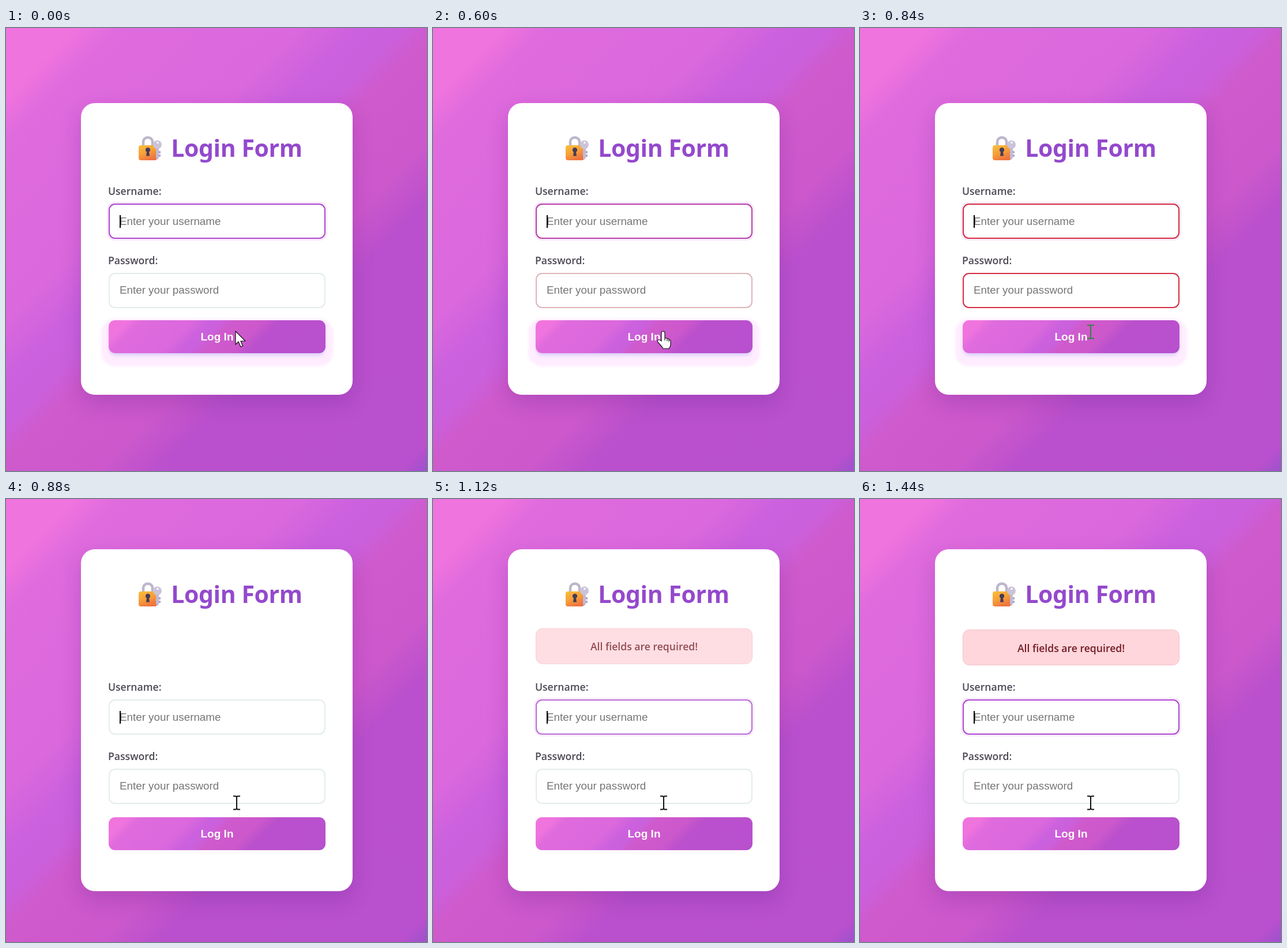
Animation, 730 px wide and 767 px high, one loop 1480 ms. Source, as an HTML page:

```html
<!DOCTYPE html>
<html lang="en">
<head>
<meta charset="utf-8">
<title>Login Form</title>
<style>
  :root {
    --blend: linear-gradient(135deg, #f074de 8%, #df6bdd 13%, #db68dd 34%, #cb61de 41%,
      #cb60dc 46%, #cf5acc 50%, #cc58cc 62%, #ba50cd 69%, #b950cd 97%, #a451cd 99%);
  }
  html, body { margin: 0; width: 100%; height: 100%; overflow: hidden; }
  #stage { position: relative; width: 730px; height: 767px; overflow: hidden; background: var(--blend); }
  #stage > * { position: absolute; box-sizing: border-box; }
  #card {
    left: 130px; width: 471px; border-radius: 24px; background: #fff;
    box-shadow: 0 15px 36px rgba(90, 30, 140, .24);
  }
  .field, #button { left: 178px; width: 376px; border-radius: 11px; }
  .field { height: 61px; border: 2px solid; background: #fff; }
  #button { height: 57px; background: var(--blend); }
  #button.hover { box-shadow: 0 5px 7px -2px #d3c6f7, 0 10px 4px 13px #ffedff; }
  svg { left: 0; top: 0; }
  .label { font: 600 17.6px "Open Sans", "Noto Sans", sans-serif; fill: #4d4854; }
  .hint { font: 18.8px "Liberation Sans", Arial, sans-serif; fill: #757575; }
  .title { font: 700 41px "Noto Sans", sans-serif; letter-spacing: -.4px; fill: #9449cd; }
  .action { font: 700 19px "Liberation Sans", Arial, sans-serif; fill: #fff; }
  .mid { text-anchor: middle; }
</style>
</head>
<body>
<div id="stage">
  <div id="card"></div>
  <div id="user" class="field"></div>
  <div id="pass" class="field"></div>
  <div id="button"></div>
  <svg width="730" height="767">
    <defs>
      <linearGradient id="brass" x2=".5" y2="1">
        <stop offset=".1" stop-color="#f9b93c"/>
        <stop offset=".55" stop-color="#f69f38"/>
        <stop offset="1" stop-color="#ee7440"/>
      </linearGradient>
    </defs>
    <g id="head">
      <path d="M238 206V197a8 7.500 0 0 1 16 0V206" fill="none" stroke="#bdb7cb" stroke-width="4.500"/>
      <rect x="230" y="203" width="32" height="26" rx="4" fill="url(#brass)"/>
      <path d="M246 207a4 4 0 0 1 2 7.500l1 7h-6l1-7a4 4 0 0 1 2-7.500z" fill="#433b59"/>
      <path d="M260 206h5v19l-2.500 3-2.500-3z" fill="#c3b9d2"/>
      <path d="M265 213h3v4h-3zM265 219h3v4h-3z" fill="#b2a6c5"/>
      <circle cx="262.500" cy="202" r="7.500" fill="#cbc3d8"/>
      <circle cx="263" cy="198.500" r="1.800" fill="#fff"/>
      <text class="title mid" x="400" y="223">Login Form</text>
    </g>
    <g id="error">
      <rect x="178.500" y="226.500" width="375" height="61" rx="11" fill="#ffd6dc" stroke="#f3c0ca"/>
      <text class="label mid" x="366" y="264.500" style="fill:#721c24">All fields are required!</text>
    </g>
    <g id="form">
      <text class="label" x="177" y="289">Username:</text>
      <text class="hint" x="197" y="340.500">Enter your username</text>
      <rect x="197" y="324" width="2" height="22"/>
      <text class="label" x="177" y="408.500">Password:</text>
      <text class="hint" x="197" y="460">Enter your password</text>
    </g>
    <text id="action" class="action mid" x="366">Log In</text>
    <g fill="#fff" stroke="#111" stroke-width="1.200" stroke-linejoin="round">
      <path id="arrow" transform="translate(398 525)" d="M0 0V23L5 18L9 27L12.500 25.500L9 17H17Z"/>
      <path id="hand" transform="translate(388 525)" d="M8 3q0-3 3-3t3 3v9q3-1 4 1 3-1 3 2 3-1 3 2v6q0 4-3 7h-10l-2-3-7-8q-2-3 1-4 2-1 5 2zM14 12v4M18 13v4M21 15v3"/>
      <path id="beam" transform="translate(400 526)" fill="none" stroke-width="2"
        d="M-6-11.500h4.500l1.500 1.500 1.500-1.500H6M0-10V10M-6 11.500h4.500l1.500-1.500 1.500 1.500H6"/>
    </g>
  </svg>
</div>
<script>
  const LOOP = 1480, STEP = 40;
  const INVALID_AT = 540, HAND_AT = 560, BEAM_AT = 820, ERROR_AT = 880;
  const IDLE = [227, 236, 236], FOCUS = [176, 72, 208], INVALID = [214, 45, 66];
  const $ = id => document.getElementById(id);

  // CSS "ease" timing curve
  function ease(p) {
    p = Math.min(1, Math.max(0, p));
    let s = p;
    for (let i = 0; i < 8; i++) s -= (.75 * s * (1 - s) + s ** 3 - p) / (.75 - 1.5 * s + 3 * s * s);
    return .3 * s * (1 - s) ** 2 + 3 * s * s * (1 - s) + s ** 3;
  }

  const mix = (a, b, p) => `rgb(${a.map((v, i) => v + (b[i] - v) * p)})`;
  const show = (id, on) => $(id).style.display = on ? '' : 'none';
  const shift = (id, y) => $(id).setAttribute('transform', `translate(0 ${y})`);
  const place = (id, top) => $(id).style.top = top + 'px';

  function draw(t) {
    const open = t >= ERROR_AT, offset = open ? 43 : 0;
    const invalid = ease((t - INVALID_AT) / 300), reveal = ease((t - ERROR_AT) / 500);

    place('card', 130 - offset);
    $('card').style.height = 505 + (open ? 87 : 0) + 'px';
    place('user', 304 + offset);
    place('pass', 424 + offset);
    place('button', open ? 551 : 506);
    $('button').className = open ? '' : 'hover';
    $('action').setAttribute('y', open ? 585.5 : 540.5);
    shift('head', -offset);
    shift('form', offset);

    $('user').style.borderColor = open ? mix(IDLE, FOCUS, reveal) : mix(FOCUS, INVALID, invalid);
    $('user').style.boxShadow = `0 0 0 3px rgba(186,85,211,${.14 * (open ? reveal : 1)})`;
    $('pass').style.borderColor = open ? mix(IDLE, IDLE, 0) : mix(IDLE, INVALID, invalid);

    $('error').style.opacity = reveal;
    shift('error', -10 * (1 - reveal));

    show('arrow', t < HAND_AT);
    show('hand', t >= HAND_AT && t < BEAM_AT);
    show('beam', t >= BEAM_AT);
    $('beam').setAttribute('stroke', open ? '#111' : '#34843f');
  }

  function tick() {
    const t = performance.now() % LOOP;
    draw(t - t % STEP);
    requestAnimationFrame(tick);
  }
  tick();
</script>
</body>
</html>
```
